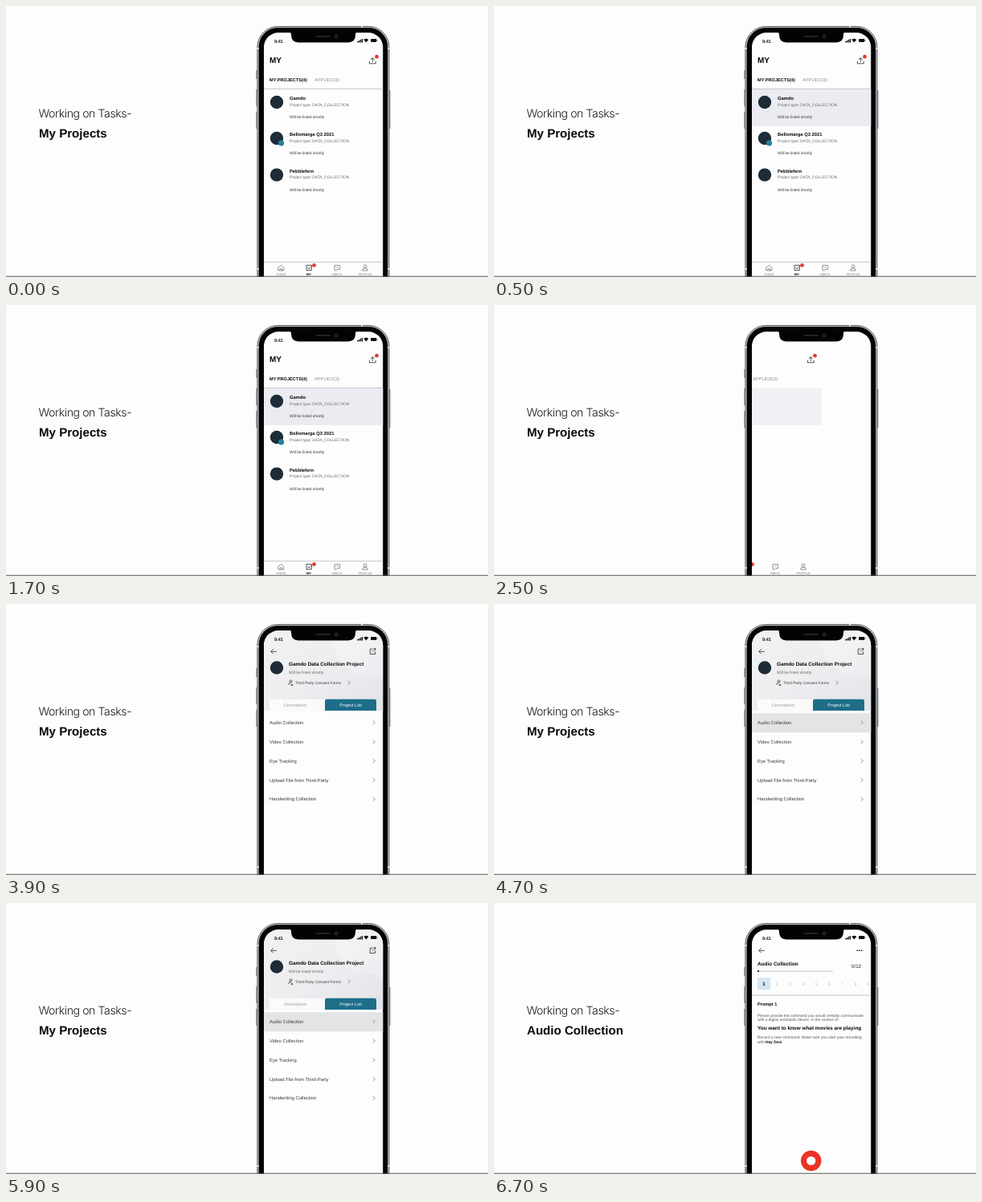
These frames come from a looping animation (600 px wide and 338 px high, 8000 ms). An HTML page:

```html
<!DOCTYPE html>
<html lang="en">
<head>
<meta charset="utf-8">
<title>Working on Tasks</title>
<style>
html, body { margin: 0; width: 100%; height: 100%; overflow: hidden; background: #fdfdfd; }
svg { display: block; width: 600px; height: 338px; font-family: "Liberation Sans", Arial, sans-serif; text-rendering: geometricPrecision; }
.line { fill: none; stroke: #333; stroke-width: .85; }
.soft { stroke: #808080; }
.rule { stroke: #bbb; }
</style>
</head>
<body>
<svg viewBox="0 0 600 338">
  <defs>
    <clipPath id="glass"><rect x="321" y="33.3" width="148.2" height="330" rx="18"/></clipPath>
    <linearGradient id="sky" x2="1" y2="1">
      <stop stop-color="#f1f1f3"/><stop offset=".5" stop-color="#eeeef1"/><stop offset="1" stop-color="#e2e3e7"/>
    </linearGradient>
  </defs>
  <rect width="600" height="338" fill="#fdfdfd"/>
  <g id="caption"></g>
  <path d="M311.9 80v11M311.9 104v21M311.9 132v21M477.8 105v48" stroke="#85878a" stroke-width="1.3"/>
  <rect x="312.9" y="25.5" width="164" height="340" rx="25.5" fill="#c4c6c8" stroke="#3c3e40" stroke-width=".8"/>
  <rect x="314.6" y="27" width="160.6" height="340" rx="24" fill="#030303"/>
  <rect x="321" y="33.3" width="148.2" height="330" rx="18" fill="#fdfdfd"/>
  <g clip-path="url(#glass)">
    <g id="list"></g>
    <g id="project"></g>
    <g id="audio"></g>
    <g id="status"></g>
  </g>
  <path d="M350 32c4 0 5 1 5 4q0 9.4 9 9.4h62q9 0 9-9.4c0-3 1-4 5-4z" fill="#030303"/>
  <rect x="386" y="37" width="18" height="1.8" rx=".9" fill="#25272a"/>
  <circle cx="411" cy="38" r="2.2" fill="#15181f" stroke="#30343c" stroke-width=".6"/>
  <path d="M312.5 53h2.1M475.2 53h2.1M312.5 328h2.1M475.2 328h2.1M443 25v2" stroke="#f2f2f2" stroke-width="1.8"/>
  <path d="M0 337.3h600" stroke="#55575a" stroke-width="1.1"/>
</svg>
<script>
const $ = id => document.getElementById(id);
const text = (x, y, size, s, fill = '#383838', extra = '') =>
  `<text x="${x}" y="${y}" font-size="${size}" fill="${fill}" ${extra}>${s}</text>`;
const bold = (x, y, size, s, extra = '') => text(x, y, size, s, '#08080a', 'font-weight="700" ' + extra);
const path = (d, cls = '') => `<path class="line ${cls}" d="${d}"/>`;
const dot = (x, y, r, fill) => `<circle cx="${x}" cy="${y}" r="${r}" fill="${fill}"/>`;
const box = (x, y, w, h, fill, extra = '') =>
  `<rect x="${x}" y="${y}" width="${w}" height="${h}" fill="${fill}" ${extra}/>`;
const chevron = (x, y) => path(`M${x - 1.1} ${y - 2.3}l2.3 2.3l-2.3 2.3`, 'soft');
const rule = y => path(`M320 ${y}h150`, 'rule');
const mid = 'text-anchor="middle"';
const back = path('M336.8 59.3h-7M332.7 56.3l-3 3l3 3');

// Caption beside the phone
$('caption').innerHTML =
  text(40.5, 139, 14.2, 'Working on Tasks-', '#1a1a1a',
    'font-family="Inter, sans-serif" font-weight="300" letter-spacing="-.46"') +
  bold(41, 163.8, 15.1, '', 'id="heading"');

$('status').innerHTML =
  text(334, 45.8, 5.6, '9:41', '#111', 'stroke="#111" stroke-width=".15"') +
  [0, 1, 2, 3].map(i => box(437 + i * 1.9, 44 - i, 1.4, 1.5 + i, '#111')).join('') +
  '<path d="M445.3 42q3-2.6 6 0l-3 3.5z" fill="#111"/>' +
  box(454, 41, 7.3, 4, '#111', 'rx="1"') + box(461.7, 42.2, .6, 1.6, '#111');

// Project overview
const card = (y, name) =>
  dot(337, y + 5, 8.2, '#1d2c36') + bold(353, y + 2.4, 5.8, name) +
  text(353, y + 9.8, 4.86, 'Project type: DATA_COLLECTION', '#666') +
  text(353, y + 25, 4.9, 'Will be listed shortly');
const tab = (x, name) => text(x, 336, 4, name, '#808080', mid);

$('list').innerHTML =
  box(320, 104, 150, 46, '#ebecf2', 'id="pressed"') +
  '<g id="cards">' + card(115, 'Gamdo') + card(160, 'Bellomarga Q3 2021') + card(205.6, 'Pebblefern') +
  dot(342.5, 171, 3.6, '#23829b') + rule(103.4) + rule(319.3) + '</g>' +
  bold(328, 71.3, 10, 'MY') +
  bold(328, 94.2, 5.6, 'MY PROJECTS(4)') + text(384, 94.2, 5.7, 'APPLIED(3)', '#909090') +
  path('M456.3 70v-5.2M454 67l2.3-2.4l2.3 2.4M452.4 69v2.8h7.8v-2.8') + dot(461.5, 63.2, 2.4, '#e23a31') +
  path('M338.8 326.3l3.5-3l3.5 3v3.6h-7zM341 330v-2.2h2.6v2.2', 'soft') +
  path('M374 323.3h6.4v6.4h-6.4zM375.5 326.4l1.5 1.6l2.6-3.2') + dot(383.5, 323.4, 2.4, '#e23a31') +
  path('M409 323.4h6.6v5h-3l-1.6 1.5h-2zM410.5 326h.8m.6 0h.8m.6 0h.8', 'soft') +
  path('M445.2 324.7a1.9 1.9 0 1 1 3.8 0a1.9 1.9 0 1 1-3.8 0M443.6 330q0-3 3.4-3t3.4 3z', 'soft') +
  tab(342.3, 'HOME') + bold(377, 336, 4, 'MY', mid) + tab(412, 'INBOX') + tab(447, 'PROFILE');

// Single project
const tasks = ['Audio Collection', 'Video Collection', 'Eye Tracking', 'Upload File from Third-Party', 'Handwriting Collection'];
$('project').innerHTML =
  box(320, 33, 151, 100, 'url(#sky)') +
  '<path d="M405 33h66v62q-14-9-26-7t-25-14t-15-41z" fill="#fff" opacity=".2"/>' +
  back + path('M456.5 56.2h-3.3v6.3h6.4v-3.2M456 59.6l3.8-3.8M457.5 55.6h2.4v2.4') +
  dot(337, 79.5, 8.2, '#1d2c36') +
  bold(352, 77.3, 6.36, 'Gamdo Data Collection Project') +
  text(352, 86.7, 4.9, 'Will be listed shortly', '#666') +
  path('M353 96.4a1.5 1.5 0 1 1 3 0a1.5 1.5 0 1 1-3 0M351.8 101q0-2.6 2.8-2.6M354.6 101h2.8M356 99.6v2.8') +
  text(360, 99.8, 4.75, 'Third Party Consent Forms') + chevron(427, 98) +
  box(328, 119, 69, 14, '#fff', 'opacity=".75"') +
  text(360, 128.2, 5.6, 'Description', '#a0a0a0', mid) +
  '<path d="M397 133v-12q0-2.2 2.2-2.2h59.6q2.2 0 2.2 2.2v12z" fill="#1e6d89"/>' +
  text(429, 127.8, 5.6, 'Project List', '#fff', mid) +
  box(320, 136.3, 150, 24, '#e3e4e6', 'id="chosen"') +
  tasks.map((s, i) => text(328, 150 + i * 23.85, 5.87, s) + chevron(458, 148 + i * 23.85)).join('');

// Recording screen
$('audio').innerHTML =
  back + [452.2, 455, 457.8].map(x => dot(x, 59.2, .85, '#222')).join('') +
  bold(328, 78.2, 6.4, 'Audio Collection') + text(451, 81, 6.2, '0/12', '#222', mid) +
  path('M328 85h94', 'rule') + box(328, 84, 2, 2, '#222') +
  box(328, 93, 16.2, 15.2, '#d5e7f3') + bold(336, 103, 6.2, '1', mid) +
  [2, 3, 4, 5, 6, 7, 8, 9].map(n => text(336 + (n - 1) * 16.3, 102.5, 5.2, n, '#bbb', mid)).join('') +
  rule(115) +
  bold(328, 127.8, 5.6, 'Prompt 1') +
  text(328, 141.8, 4.78, 'Please provide the command you would verbally communicate', '#555') +
  text(328, 147.3, 4.78, 'with a digital assistants device, in the context of:', '#555') +
  bold(328, 158.2, 6.38, 'You want to know what movies are playing') +
  text(328, 169.2, 4.83, 'Record a new command. Make sure you start your recording', '#555') +
  text(328, 175, 4.83, 'with <tspan font-weight="700" fill="#08080a">Hey Dovi</tspan>', '#555') +
  dot(394.7, 321.5, 12.7, '#ea3323') + dot(394.7, 321.5, 5.6, '#fff');

const show = (id, on) => $(id).style.display = on ? '' : 'none';

function draw() {
  const t = performance.now() % 8000;
  const sliding = t >= 2500 && t < 2700;
  show('list', t < 2700);
  show('pressed', t >= 500);
  show('cards', !sliding);
  show('status', !sliding);
  show('project', t >= 2700 && t < 6700);
  show('chosen', t >= 4700);
  show('audio', t >= 6700);
  $('pressed').style.opacity = sliding ? .65 : 1;
  $('list').setAttribute('transform', `translate(${sliding ? -62 : 0})`);
  $('heading').textContent = t < 6700 ? 'My Projects' : 'Audio Collection';
  requestAnimationFrame(draw);
}
draw();
</script>
</body>
</html>
```
